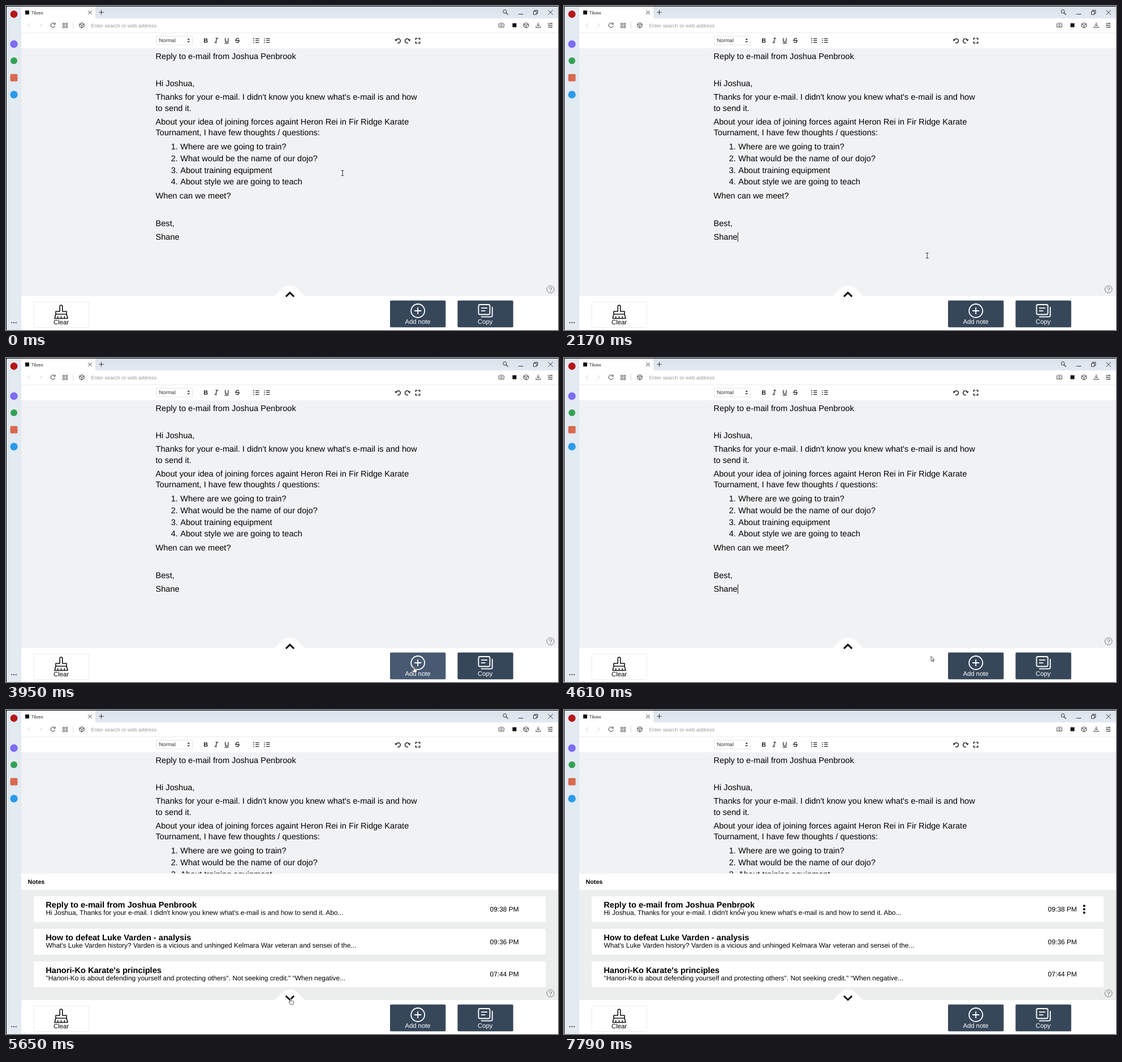
These frames come from a looping animation (976x574 px, 8 s). An HTML page:

```html
<!DOCTYPE html>
<html lang="en">
<head>
<meta charset="utf-8">
<title>Notes editor</title>
<style>
  html, body { margin: 0; width: 100%; height: 100%; overflow: hidden; background: #fff; }
  svg { display: block; width: 976px; height: 574px; }
  text { font-family: "Liberation Sans", Arial, sans-serif; text-rendering: geometricPrecision; white-space: pre; }
  .body { font-size: 14.6px; }
  .title { font-size: 14.6px; font-weight: bold; }
  .sub { font-size: 11.93px; }
  .time { font-size: 12px; }
  .btn { font-size: 11.3px; text-anchor: middle; }
  .line { fill: none; stroke: #333; stroke-width: 1; }
  .tool { fill: none; stroke: #222; stroke-width: 1.2; }
</style>
</head>
<body>
<svg viewBox="0 0 976 574" xmlns="http://www.w3.org/2000/svg">
  <defs>
    <linearGradient id="bar" x2="0" y2="1">
      <stop offset="0" stop-color="#dbe3ec"/><stop offset="1" stop-color="#e2e9f1"/>
    </linearGradient>
    <path id="cube" class="line" d="M0-4.5L4-2.3V2.3L0 4.5L-4 2.3V-2.3ZM-4-2.3L0 0L4-2.3M0 0V4.5"/>
  </defs>

  <rect width="976" height="574" fill="#fff"/>
  <rect x="27" y="75" width="949" height="439" fill="#f1f2f4"/>
  <rect width="976" height="22" fill="url(#bar)"/>
  <rect width="27" height="574" fill="#e2eaf2"/>
  <path d="M27 22V4q0-3 3-3H158V22Z" fill="#fff"/>
  <path d="M27 47.5H976" stroke="#e9ebef"/>
  <path d="M0 .5H976M.5 0V574" stroke="#000"/>

  <!-- sidebar -->
  <circle cx="14" cy="14.5" r="6.5" fill="#b3161b"/>
  <circle cx="14" cy="67.5" r="6.7" fill="#7d6cf0"/>
  <circle cx="14" cy="97" r="6" fill="#35a053"/>
  <rect x="7.5" y="120.5" width="13" height="13" rx="2" fill="#d8694f"/>
  <circle cx="14" cy="157" r="6.7" fill="#2b9be6"/>
  <g fill="#333"><circle cx="10.2" cy="561" r="1.1"/><circle cx="14" cy="561" r="1.1"/><circle cx="17.8" cy="561" r="1.1"/></g>

  <!-- tab strip and address row -->
  <rect x="34" y="8" width="7" height="7" fill="#111"/>
  <text x="44.5" y="14.6" font-size="8.2" fill="#222">Tilvex</text>
  <g class="line">
    <path d="M145.3 8.3l6.4 6.4m0-6.4l-6.4 6.4M164.3 11.2h8.4m-4.2-4.2v8.4"/>
    <circle cx="882" cy="9.7" r="3"/><path d="M884.2 12l3.6 3.6" stroke-width="1.3"/>
    <path d="M906 14.5h8.5M932.5 9.5h5.5v5.5h-5.5zM934.5 9.2V7.5h5.5v5.5h-1.8M958.8 7.3l8 8m0-8l-8 8"/>
    <path d="M42.5 30.5l-3.7 3.7 3.7 3.7M59.5 30.5l3.7 3.7-3.7 3.7" stroke="#ccc"/>
    <path d="M86.3 31.6a4 4 0 1 0 .7 3.5M87 29.8v2.6h-2.8"/>
    <path d="M100.5 30.5h3v3h-3zM105.7 30.5h3v3h-3zM100.5 35.5h3v3h-3zM105.7 35.5h3v3h-3z" stroke="#555"/>
    <path d="M118.5 28.5v12" stroke="#ddd"/>
    <path d="M871.5 31.3h2.3l.8-1.2h2.8l.8 1.2h2.3v6.2h-9z" stroke="#555"/><circle cx="876" cy="34.3" r="1.7" stroke="#555"/>
    <path d="M941 29.5v6m-2.6-2.5l2.6 2.6 2.6-2.6M937 36v2h8v-2"/>
    <path d="M958 31h8.5M958 34.2h8.5M958 37.4h8.5M964 29.8v2.4M960.5 33v2.4M964 36.2v2.4"/>
  </g>
  <use href="#cube" x="134" y="34.2"/>
  <use href="#cube" x="919.5" y="34.2"/>
  <rect x="895.5" y="30.5" width="7" height="7" fill="#111"/>
  <text x="150.5" y="37.6" font-size="9.05" fill="#9b9b9b">Enter search or web address</text>

  <!-- formatting tools -->
  <rect x="265.5" y="53.5" width="64" height="15.5" fill="#fff" stroke="#e7e7e7"/>
  <text x="270.4" y="64" font-size="9.2" fill="#333">Normal</text>
  <path d="M320.5 60l2.3-2.8 2.3 2.8zM320.5 62.2l2.3 2.8 2.3-2.8z" fill="#333"/>
  <text x="349.2" y="65" font-size="11" font-weight="bold" fill="#222">B</text>
  <g class="tool">
    <path d="M370.5 57.2h4.6M368.5 65h4.6M372.9 57.2L370.7 65"/>
    <path d="M387.6 56.8v4.2a2.7 2.7 0 0 0 5.4 0v-4.2M386.6 65.8h7.4"/>
    <path d="M411.8 58.7q-1-1.8-3.2-1.4-2.4.6-1.6 2.4.6 1 2.4 1.4 2.6.6 2.4 2.2-.6 1.7-3 1.5-2-.2-2.6-1.7M404.7 61.1h8.6"/>
    <path d="M441 57.8h6.5M441 61.2h6.5M441 64.6h6.5M460 57.8h6.5M460 61.2h6.5M460 64.6h6.5"/>
    <path d="M438 56.4v2.6M437.2 61.2h1.7M437.2 64.8h1.7M456 57.8h1.8M456 61.2h1.8M456 64.6h1.8"/>
    <path d="M690 60.5a3.8 3.8 0 1 1 2.2 4.8M713 60.5a3.8 3.8 0 1 0-2.2 4.8" stroke-width="1.5"/>
    <path d="M724.4 60v-2.7h2.8M728.8 57.3h2.8v2.7M731.6 63v2.7h-2.8M727.2 65.7h-2.8V63" stroke-width="1.6"/>
  </g>
  <path d="M687.4 59.2h4.8l-2.6 3.6zM715.6 59.2h-4.8l2.6 3.6z" fill="#222"/>

  <g id="doc" class="body"></g>
  <path id="caret" d="M307.5 401V418" stroke="#222"/>

  <g id="panel">
    <rect x="27" y="289.7" width="949" height="224.3" fill="#eceeee"/>
    <rect x="27" y="289.7" width="949" height="28.8" fill="#fff"/>
    <text x="38.6" y="308.2" font-size="10.7" font-weight="bold">Notes</text>
    <g id="cards"></g>
  </g>

  <!-- bottom bar -->
  <rect x="27" y="514" width="949" height="60" fill="#fff"/>
  <path d="M472.5 514.5C482 512 487 495 502 495S522 512 531.5 514.5Z" fill="#fff"/>
  <path id="chevron" fill="none" stroke="#111" stroke-width="3"/>
  <circle cx="962.7" cy="502" r="6.4" fill="none" stroke="#777"/>
  <text x="962.7" y="505.8" font-size="10.5" fill="#666" text-anchor="middle">?</text>

  <rect x="49" y="524" width="97.5" height="45.5" rx="2" fill="#fff" stroke="#ececec"/>
  <path d="M95.2 541V532.3a2.3 2.3 0 0 1 4.6 0V541H107V546H88V541ZM88 546L86 553.5H109L107 546M91.6 553.5V549.5M97.5 553.5V549.5M103.4 553.5V549.5" fill="none" stroke="#111" stroke-width="1.6" stroke-linejoin="round"/>
  <text class="btn" x="97.5" y="564">Clear</text>

  <rect id="add" x="679" y="521.8" width="98.4" height="47.4" rx="2"/>
  <rect x="798.4" y="521.8" width="98.4" height="47.4" rx="2" fill="#37475a"/>
  <g fill="none" stroke="#fff" stroke-width="1.8">
    <circle cx="728.2" cy="540" r="12"/>
    <path d="M722.2 540h12M728.2 534v12"/>
    <rect x="835.5" y="529" width="20" height="17.5" rx="2.5"/>
    <path d="M859.8 533v15q0 2.7-2.7 2.7H840M840 535.2h11M840 540.2h7.5"/>
  </g>
  <g fill="#fff"><text class="btn" x="728" y="563">Add note</text><text class="btn" x="847.3" y="563">Copy</text></g>

  <circle id="glow" r="8.5" fill="#ffe800" opacity=".62"/>
  <g id="mouse">
    <path id="beam" d="M-2.5-4.5H2.5M0-4.5V4.5M-2.5 4.5H2.5" fill="none" stroke="#333"/>
    <path id="arrow" d="M0 0V8.6L2 6.8L3.5 10L4.9 9.4L3.5 6.3H6Z" fill="#fff" stroke="#222" stroke-width=".8"/>
    <path id="hand" d="M-1 .8Q0-.6 1 .8V4L4.4 4.8Q5.4 5.2 5.2 6.4L4.4 10.6H-.6L-3.4 6.6Q-3.4 5-1 6.4Z" fill="#fff" stroke="#333" stroke-width=".8"/>
  </g>
</svg>
<script>
const LOOP = 8000;
const el = id => document.getElementById(id);
const show = (id, on) => el(id).setAttribute("visibility", on ? "visible" : "hidden");

const paragraphs = [
  [93.6, "Reply to e-mail from Joshua Penbrook"],
  [142.3, "Hi Joshua,"],
  [166.4, "Thanks for your e-mail. I didn't know you knew what's e-mail is and how"],
  [185.8, "to send it."],
  [210, "About your idea of joining forces againt Heron Rei in Fir Ridge Karate"],
  [229.4, "Tournament, I have few thoughts / questions:"],
  [341.1, "When can we meet?"],
  [389.8, "Best,"],
  [414.2, "Shane"]
];
const questions = [
  "Where are we going to train?",
  "What would be the name of our dojo?",
  "About training equipment",
  "About style we are going to teach"
];
const text = (x, y, s, cls = "body") => `<text class="${cls}" x="${x}" y="${y}">${s}</text>`;
el("doc").innerHTML =
  paragraphs.map(([y, s]) => text(264.5, y, s)).join("") +
  questions.map((s, i) => {
    const y = 254.2 + i * 20.67;
    return text(291.7, y, i + 1 + ".") + text(308.2, y, s);
  }).join("");

const notes = [
  ["Reply to e-mail from Joshua Penbrook", "Hi Joshua, Thanks for your e-mail. I didn't know you knew what's e-mail is and how to send it. Abo...", "09:38 PM"],
  ["How to defeat Luke Varden - analysis", "What's Luke Varden history? Varden is a vicious and unhinged Kelmara War veteran and sensei of the...", "09:36 PM"],
  ["Hanori-Ko Karate's principles", "\"Hanori-Ko is about defending yourself and protecting others\". Not seeking credit.\" “When negative...", "07:44 PM"]
];
const cardTop = i => 330 + i * 57.75;
el("cards").innerHTML = notes.map(([title, sub, time], i) => {
  const dots = [17, 23, 29].map(y => `<circle cx="919.8" cy="${y}" r="2.1"/>`).join("");
  return `<g transform="translate(0 ${cardTop(i)})"><rect x="49" width="905" height="45.5" fill="#fff"/>` +
    text(70.3, 20.2, title, "title") + text(70.5, 33.3, sub, "sub") + text(855.5, 26.8, time, "time") +
    `<g id="dots${i}">${dots}</g></g>`;
}).join("");

// pointer keys: time, x, y
const path = [
  [0, 595, 296], [930, 595, 296], [1770, 602.5, 380], [2170, 642, 442], [2590, 686, 503], [2930, 721.5, 547],
  [4340, 721.5, 547], [4610, 649.3, 528.5], [4880, 575, 517], [5160, 518, 512], [5440, 503.5, 511],
  [6900, 503.5, 511], [6970, 502.5, 505.5], [7400, 398, 424], [7790, 312.5, 348.5], [LOOP, 312.5, 348.5]
];

// zero at the ends and beside rests, so moves start and stop softly
function slope(i, k) {
  const a = path[i - 1], b = path[i], c = path[i + 1];
  if (!a || !c) return 0;
  const rest = (p, q) => p[1] === q[1] && p[2] === q[2];
  return rest(a, b) || rest(b, c) ? 0 : (c[k] - a[k]) / (c[0] - a[0]);
}

function pointer(t) {
  let i = 0;
  while (i < path.length - 2 && t >= path[i + 1][0]) i++;
  const a = path[i], b = path[i + 1], d = b[0] - a[0], u = (t - a[0]) / d;
  const s = u * u * (3 - 2 * u);
  return [1, 2].map(k => a[k] + (b[k] - a[k]) * s +
    d * (slope(i, k) * u * (1 - u) ** 2 - slope(i + 1, k) * u * u * (1 - u)));
}

const within = (t, spans) => spans.some(([a, b]) => t >= a && t < b);
const blinks = [[70, 520], [1000, 1450], [1910, 2370], [2820, 3280], [3410, 3950], [4410, 4880]];
const clicks = [[3280, 3410], [5510, 5650]];

function draw(t) {
  const [x, y] = pointer(t);
  const open = t >= 5650;
  const overAdd = x >= 679 && x <= 777 && y >= 522 && y <= 569;
  const card = open ? notes.findIndex((n, i) => y >= cardTop(i) && y <= cardTop(i) + 45.5) : -1;
  const overTab = open && y > 495;
  const hand = overAdd || card >= 0 || overTab;
  const beam = !hand && t < 4340 && y < 514;

  show("caret", within(t, blinks));
  show("panel", open);
  notes.forEach((n, i) => show("dots" + i, i === card));
  el("chevron").setAttribute("d", open ? "M494.8 506.5L502 513.5L509.2 506.5" : "M494.8 514.8L502 507.8L509.2 514.8");
  el("add").setAttribute("fill", overAdd ? "#475a72" : "#37475a");

  show("glow", within(t, clicks));
  el("glow").setAttribute("transform", `translate(${x} ${y})`);
  el("mouse").setAttribute("transform", `translate(${x} ${y})`);
  show("hand", hand);
  show("beam", beam);
  show("arrow", !hand && !beam);
}

const start = performance.now();
function tick() {
  draw((performance.now() - start) % LOOP);
  requestAnimationFrame(tick);
}
tick();
</script>
</body>
</html>
```
